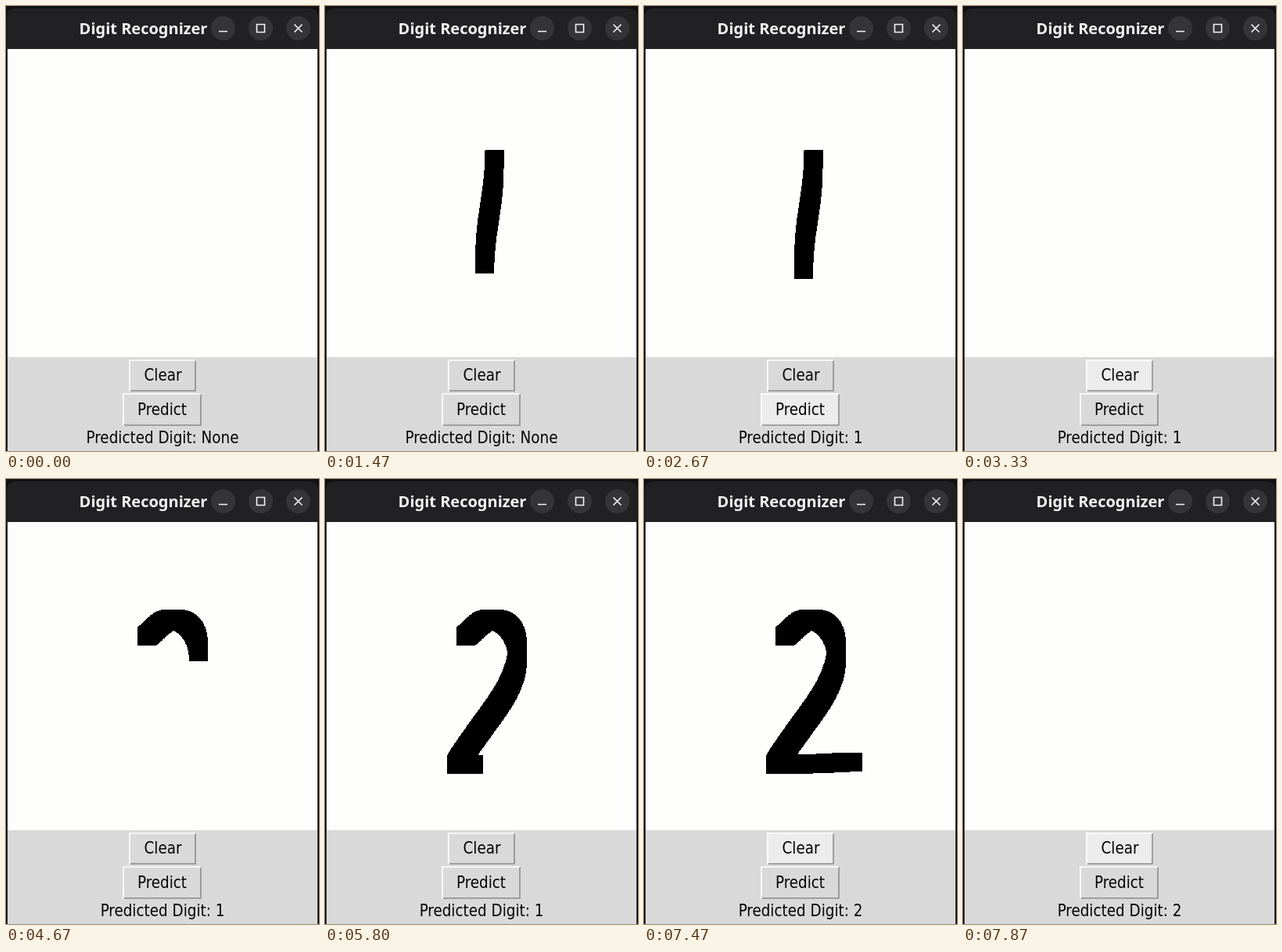
An HTML page with a canvas that plays this animation: 400 px wide and 569 px high, repeating every 8000 ms.

```html
<!DOCTYPE html>
<html lang="en">
<head>
<meta charset="utf-8">
<title>Digit Recognizer</title>
<style>
  html, body { margin: 0; width: 100%; height: 100%; overflow: hidden; background: #111113; }
  #window { position: relative; width: 400px; height: 569px; overflow: hidden; }
  svg, canvas { position: absolute; left: 0; top: 0; }
  canvas { left: 2px; top: 55px; }
  text { font: 20.4px "DejaVu Sans Condensed", "Noto Sans", sans-serif; text-anchor: middle; fill: #060606; }
  .title { font: bold 20px "Noto Sans", sans-serif; fill: #f4f4f4; }
  .face { fill: #d9d9d9; }
  .active .face { fill: #ececec; }
  .light, .dark, .icon { fill: none; stroke-width: 1.6; }
  .light { stroke: #fff; }
  .dark { stroke: #8c8c8c; }
  .icon { stroke: #f4f4f4; }
</style>
</head>
<body>
<div id="window">
  <svg width="400" height="569" viewBox="0 0 400 569">
    <path d="M1 569V14Q1 3 13 3H387Q399 3 399 14V569Z" fill="#212124"/>
    <path class="face" d="M2 55H398V569H2Z"/>
    <text class="title" x="175.5" y="36">Digit Recognizer</text>
    <g fill="#353538">
      <circle cx="277.5" cy="28.5" r="15.5"/>
      <circle cx="325.5" cy="28.5" r="15.5"/>
      <circle cx="373.5" cy="28.5" r="15.5"/>
    </g>
    <path class="icon" d="M272 32.5H283M320.5 23.5H330.5V33.5H320.5ZM368.5 23.5L378.5 33.5M378.5 23.5L368.5 33.5"/>
    <g id="clear">
      <path class="face" d="M157 452H243V493H157Z"/>
      <path class="dark" d="M242 453V492H158"/>
      <path class="light" d="M158 493V453H242"/>
      <text x="200.5" y="479">Clear</text>
    </g>
    <g id="predict">
      <path class="face" d="M149 495H250V537H149Z"/>
      <path class="dark" d="M249 496V536H150"/>
      <path class="light" d="M150 537V496H249"/>
      <text x="199.5" y="522.5">Predict</text>
    </g>
    <text id="result" x="200" y="559">Predicted Digit: None</text>
  </svg>
  <canvas id="pad" width="396" height="394"></canvas>
</div>
<script>
  const LOOP = 8000, BRUSH = 24;
  const byId = id => document.getElementById(id);
  const ctx = byId("pad").getContext("2d");
  const between = (t, a, b) => t >= a && t < b;

  // Brush centres along a path, one per pixel of its length.
  function trace(d) {
    const path = document.createElementNS("http://www.w3.org/2000/svg", "path");
    path.setAttribute("d", d);
    const length = Math.floor(path.getTotalLength());
    return Array.from({ length: length + 1 }, (_, i) => path.getPointAtLength(i));
  }

  const strokes = [
    { start: 1130, end: 1490, clearedAt: 3230,
      points: trace("M216.5 196C216.5 250 204 275 204 338") },
    { start: 4070, end: 6270, clearedAt: 7600,
      points: trace("M180 201C189 195 199 180 212 179C232 179 246 196 246 221" +
                    "C246 270 207 302 168 365Q215 365 267 361.5") }
  ];

  function drawStroke({ start, end, points }, t) {
    const progress = Math.min(1, (t - start) / (end - start));
    const count = Math.ceil(progress * (points.length - 1)) + 1;
    for (const { x, y } of points.slice(0, count)) {
      ctx.fillRect(Math.round(x - BRUSH / 2) - 2, Math.round(y - BRUSH / 2) - 55, BRUSH, BRUSH);
    }
  }

  function render(t) {
    ctx.fillStyle = "#fefefd";
    ctx.fillRect(0, 0, 396, 394);
    ctx.fillStyle = "#000";
    for (const stroke of strokes) {
      if (between(t, stroke.start, stroke.clearedAt)) drawStroke(stroke, t);
    }
    byId("predict").classList.toggle("active", between(t, 2330, 2930) || between(t, 6600, 7130));
    byId("clear").classList.toggle("active", between(t, 2960, 3600) || t >= 7470);
    const digit = t < 2600 ? "None" : t < 6930 ? "1" : "2";
    byId("result").textContent = "Predicted Digit: " + digit;
  }

  function tick() {
    render(performance.now() % LOOP);
    requestAnimationFrame(tick);
  }
  tick();
</script>
</body>
</html>
```
